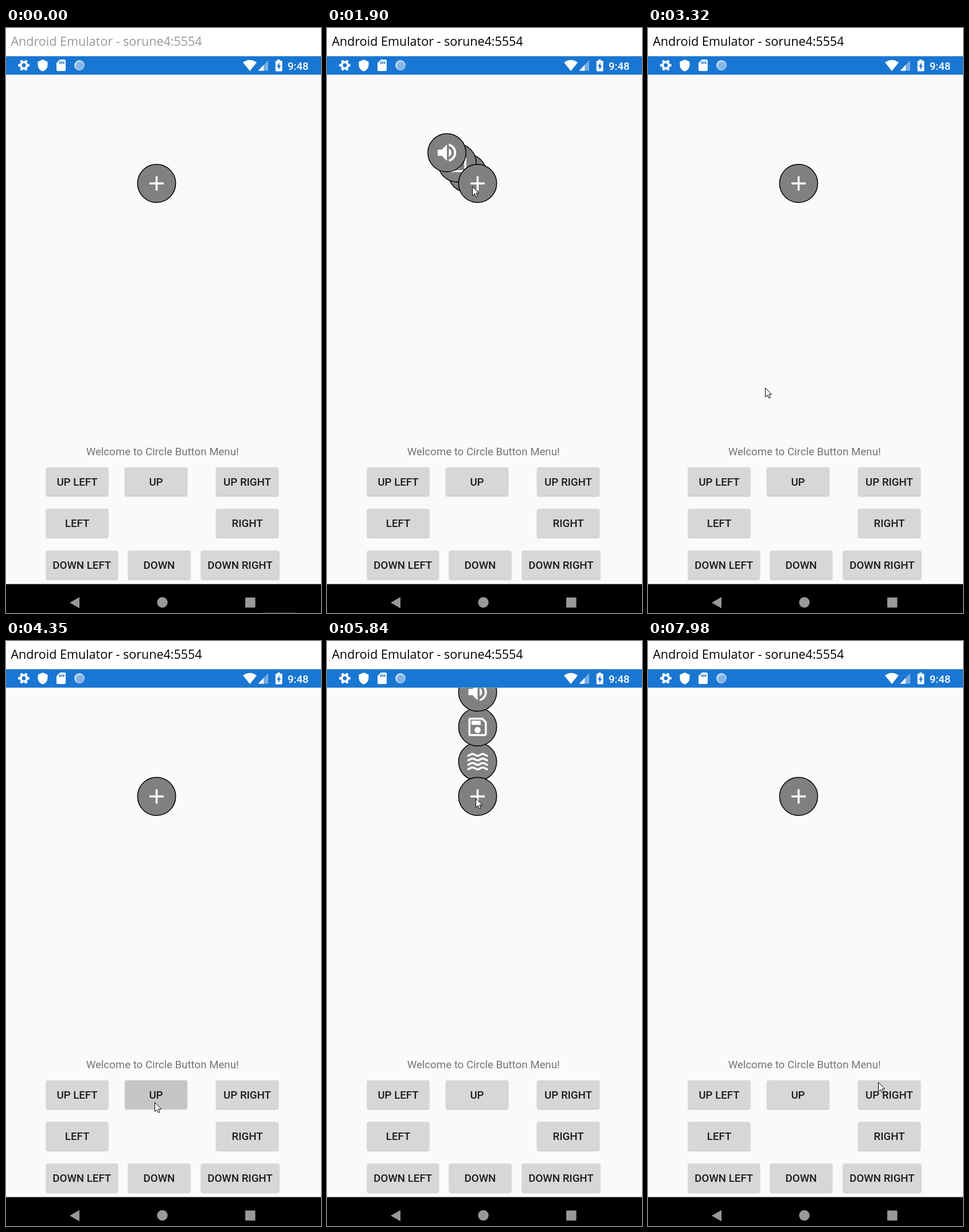
An HTML page for the animation above (8000 ms loop, 549 by 1020 pixels).

```html
<!DOCTYPE html>
<html lang="en">
<head>
<meta charset="utf-8">
<title>Circle button menu</title>
<style>
  html, body { margin: 0; width: 100%; height: 100%; overflow: hidden; background: #fafafa; }
  svg { display: block; width: 100%; height: 100%; }
  text { font: 18.68px Roboto, sans-serif; }
  #title { font: 21.5px "Open Sans", sans-serif; }
  .label, .clock { font-weight: 500; }
  .label { text-anchor: middle; fill: #1c1c1c; }
  .button { fill: #d6d7d7; filter: drop-shadow(0 1.5px 1.2px rgba(0, 0, 0, .3)); }
  .line { fill: none; stroke: #fff; stroke-width: 2; }
</style>
</head>
<body>
<svg viewBox="0 0 549 1020">
  <defs>
    <clipPath id="page"><rect y="81.4" width="549" height="888"/></clipPath>
    <circle id="disc" r="33.2" fill="#808080" stroke="#000" stroke-width="1.5"/>
  </defs>

  <rect width="549" height="1020" fill="#fafafa"/>
  <rect width="549" height="50" fill="#fff"/>
  <text id="title" x="8.5" y="31">Android Emulator - sorune4:5554</text>

  <!-- status bar -->
  <rect y="49.2" width="549" height="32.2" fill="#1976d2"/>
  <g fill="#fff">
    <g fill="none" stroke="#fff">
      <circle cx="31" cy="65" r="5.4" stroke-width="4"/>
      <circle cx="31" cy="65" r="8.4" stroke-width="3" pathLength="12" stroke-dasharray="1" stroke-dashoffset=".5"/>
    </g>
    <path d="M64 55l8.5 3.8v5.7c0 5.2-3.6 9.8-8.5 11-4.9-1.2-8.5-5.8-8.5-11v-5.7z"/>
    <path fill-rule="evenodd" d="M94 55h8a2 2 0 0 1 2 2v16a2 2 0 0 1-2 2H90a2 2 0 0 1-2-2V61zM93 58.5v4h2v-4zm3.3 0v4h2v-4zm3.3 0v4h2v-4z"/>
    <circle cx="128" cy="65" r="9" fill="#bfd9f3"/>
    <circle cx="129" cy="66" r="7" fill="#85b5e7"/>
    <path d="M425 75L413 60Q425 51.5 437 60z"/>
    <path d="M457 56v18.5h-17.5z" fill="#75ade4"/>
    <path d="M449 64.5v10h-9.5z"/>
    <path fill-rule="evenodd" d="M473 57v-2h4.5v2h2.5a1.4 1.4 0 0 1 1.4 1.4v15.7a1.4 1.4 0 0 1-1.4 1.4h-9a1.4 1.4 0 0 1-1.4-1.4V58.4A1.4 1.4 0 0 1 471 57zM476.5 60l-4.5 7.5h2.6v5.5l4.5-7.5h-2.6z"/>
    <text class="clock" x="490.7" y="73">9:48</text>
  </g>

  <!-- menu -->
  <g clip-path="url(#page)">
    <g class="item"><use href="#disc"/><g id="waves" class="line" transform="scale(1.78) translate(-12 -12)"></g></g>
    <g class="item"><use href="#disc"/>
      <path transform="scale(1.78) translate(-12 -12)" fill="#fff" fill-rule="evenodd" d="M17 3H5a2 2 0 0 0-2 2v14a2 2 0 0 0 2 2h14a2 2 0 0 0 2-2V7zm2 16H5V5h11.2L19 7.8zM12 12a3 3 0 1 0 0 6 3 3 0 0 0 0-6zM6 6h9v4H6z"/>
    </g>
    <g class="item"><use href="#disc"/>
      <path transform="scale(1.78) translate(-12 -12)" fill="#fff" d="M3 9v6h4l5 5V4L7 9zM16.5 12c0-1.8-1-3.3-2.5-4v8c1.5-.7 2.5-2.2 2.5-4zM14 3.2v2.1a7 7 0 0 1 0 13.4v2.1a9 9 0 0 0 0-17.6z"/>
    </g>
    <g transform="translate(262.5 271)"><use href="#disc"/>
      <path class="line" transform="scale(1.78)" d="M-7 0H7M0-7V7"/>
    </g>
  </g>

  <text x="272.7" y="745" fill="#757575" text-anchor="middle">Welcome to Circle Button Menu!</text>
  <g id="buttons"></g>

  <!-- navigation bar -->
  <rect y="969.6" width="549" height="51" fill="#000"/>
  <g fill="#999">
    <path d="M111 1002l17-9.8v19.6z"/>
    <circle cx="272.5" cy="1001.5" r="9.2"/>
    <rect x="417" y="993" width="17.5" height="17.5" rx="1"/>
  </g>
  <path id="edge" d="M448 1019.5h58" stroke="#444" stroke-dasharray="4 1"/>

  <path id="cursor" fill="#fff" stroke="#000" d="M.5.5v16l3.7-3.5 2.4 5.5 2.5-1.1-2.4-5.4h4.9z"/>
</svg>

<script>
const LOOP = 8000;
const SPACING = 101;
const $ = selector => document.querySelector(selector);

$('#waves').innerHTML = [0, 1, 2, 3].map(row =>
  `<path d="M2 ${6.3 + row * 4.4}c2.5 0 2.5-1.8 5-1.8s2.5 1.8 5 1.8 2.5-1.8 5-1.8 2.5 1.8 5 1.8"/>`).join('');

const button = (label, row, x, width = 108) => {
  const y = 766 + row * 72.6;
  return `<rect class="button" x="${x}" y="${y}" width="${width}" height="49.5" rx="2.5"/>
    <text class="label" x="${x + width / 2}" y="${y + 31.8}">${label}</text>`;
};

$('#buttons').innerHTML =
  button('UP LEFT', 0, 70) + button('UP', 0, 207.5) + button('UP RIGHT', 0, 366.5) +
  button('LEFT', 1, 70) + button('RIGHT', 1, 366.5) +
  button('DOWN LEFT', 2, 70, 124.5) + button('DOWN', 2, 213) + button('DOWN RIGHT', 2, 340, 136);

const items = document.querySelectorAll('.item');
const upButton = document.querySelectorAll('.button')[1];

function stepAt({ start, end, steps }, time) {
  const step = Math.floor((time - start) / (end - start) * (steps - 1) + 0.1);
  return Math.min(steps - 1, step);
}

const latest = (phases, time) => phases.filter(phase => time >= phase.start).pop();

// Mouse strokes: each leaves from the end of the one before and bends towards "via".
const strokes = [
  { start: 430, end: 1060, steps: 9, from: [398, 915], via: [365, 330], to: [253, 276] },
  { start: 3160, end: 3890, steps: 10, via: [150.6, 668], to: [259, 804] },
  { start: 4690, end: 5000, steps: 5, via: [262, 400], to: [287, 166] },
  { start: 5070, end: 5370, steps: 5, via: [298, 200], to: [259, 274] },
  { start: 6680, end: 7060, steps: 6, via: [270, 560], to: [379, 683] },
  { start: 7130, end: 7520, steps: 6, via: [398, 752], to: [408, 791] },
  { start: 7980, end: LOOP, steps: 1, via: [401, 769], to: [401, 769] }
];
strokes.forEach((stroke, i) => { stroke.from ??= strokes[i - 1].to; });

const easeOut = x => 1 - (1 - x) ** 2.2;

function cursorAt(time) {
  const stroke = latest(strokes, time);
  if (!stroke) return null;
  const s = easeOut((stepAt(stroke, time) + 1) / stroke.steps);
  return [0, 1].map(axis =>
    (1 - s) ** 2 * stroke.from[axis] + 2 * s * (1 - s) * stroke.via[axis] + s ** 2 * stroke.to[axis]);
}

const toggles = [
  { start: 1830, end: 2080, steps: 4, opens: true },
  { start: 2680, end: 3020, steps: 5 },
  { start: 5680, end: 5980, steps: 5, opens: true },
  { start: 6280, end: 6600, steps: 5 }
];

function spreadAt(time) {
  const toggle = latest(toggles, time);
  if (!toggle) return 0;
  const step = stepAt(toggle, time);
  return toggle.opens ? (step + 1) / toggle.steps : 1 - (step / (toggle.steps - 1)) ** 1.27;
}

const press = { start: 4350, end: 4510, steps: 3 };

function draw(time) {
  const focused = time >= 1290;
  $('#title').setAttribute('fill', focused ? '#000' : '#999');
  $('#edge').style.display = focused ? 'none' : '';

  const spread = spreadAt(time) * SPACING;
  const angle = time < press.start ? Math.PI * 0.75 : Math.PI / 2;
  items.forEach((item, i) => {
    const distance = spread * (i + 1);
    const x = 262.5 + distance * Math.cos(angle);
    const y = 271 - distance * Math.sin(angle);
    item.setAttribute('transform', `translate(${x} ${y})`);
    item.style.display = spread ? '' : 'none';
  });

  const pressure = time < press.start ? 0 : 1 - stepAt(press, time) / (press.steps - 1);
  const shade = 215 - 18 * pressure;
  upButton.style.fill = `rgb(${shade - 1}, ${shade}, ${shade})`;

  const position = cursorAt(time);
  $('#cursor').style.display = position ? '' : 'none';
  if (position) $('#cursor').setAttribute('transform', `translate(${position.map(Math.round)})`);
}

function tick() {
  draw(performance.now() % LOOP);
  requestAnimationFrame(tick);
}
tick();
</script>
</body>
</html>
```
